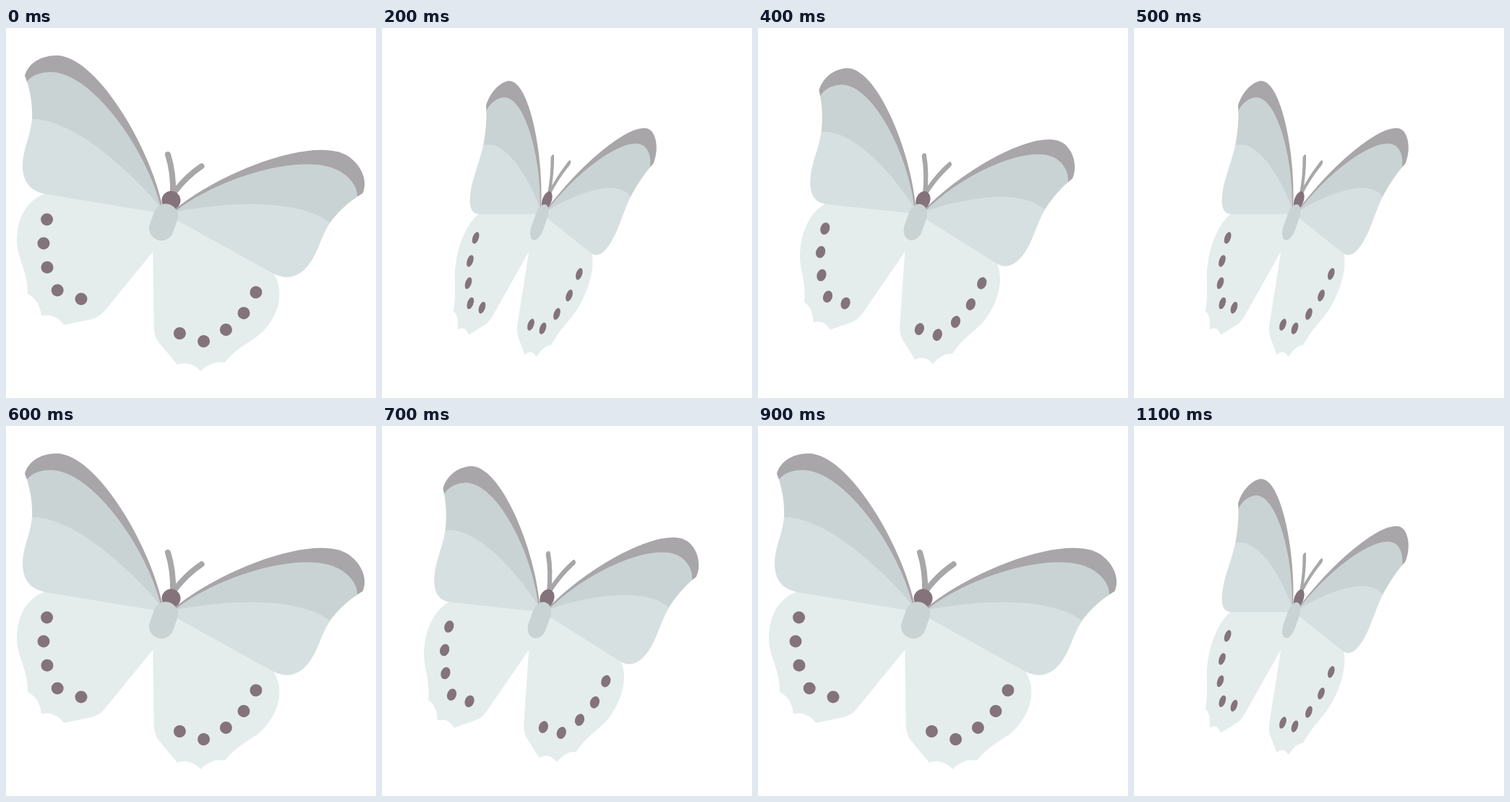
Animation, 512 px wide and 512 px high, one loop 1200 ms. Source, as an HTML page:

```html
<!DOCTYPE html>
<html lang="en">
<head>
<meta charset="utf-8">
<title>Butterfly</title>
<style>
  html, body { margin: 0; width: 100%; height: 100%; overflow: hidden; background: #fff; }
  svg { display: block; width: 100%; height: 100%; }
</style>
</head>
<body>
<svg viewBox="0 0 512 512">
  <g id="butterfly">
    <!-- one side, mirrored across the body axis -->
    <g id="side">
      <path fill="#e4edec" d="M55 229C30 237 15 262 15 293C15 320 30 334 30 368Q46 376 49 398Q69 395 80 411L118 403Q128 401 136 392L205 307.5L224 256Z"/>
      <path fill="#a8a6a9" d="M26 66C30 50 47 38 70 38C124 38 198 162 216 245L213 249L29 74Z"/>
      <path fill="#cad3d4" d="M29 74C36 65 47 61 62 61C119 61 195 169 214 247L210 252L36 128C37 108 34 90 29 74Z"/>
      <path fill="#d7e0e1" d="M36 126C90 126 165 190 213 247L212 256L55 230C34 226 23 213 23 190C23 168 34 150 36 126Z"/>
      <path fill="none" stroke="#a8a6a9" stroke-width="8" stroke-linecap="round" d="M224 175Q232 200 231 230"/>
      <g id="dots" fill="#84737a"></g>
    </g>
    <use id="mirror" href="#side"/>
    <circle cx="228.5" cy="238.6" r="13" fill="#84737a"/>
    <path stroke="#cad3d3" stroke-width="34" stroke-linecap="round" d="M221 260.3L215 277.2"/>
  </g>
</svg>
<script>
  const byId = id => document.getElementById(id);
  const butterfly = byId('butterfly');

  // Scale across the tilted body axis.
  const squeeze = s =>
    `translate(201.2 315.5) rotate(19.2) scale(${s} 1) rotate(-19.2) translate(-201.2 -315.5)`;

  byId('mirror').setAttribute('transform', squeeze(-1));
  byId('dots').innerHTML = [[56.6, 265], [52, 298], [57, 331.3], [71.2, 363], [104, 375]]
    .map(([x, y]) => `<circle cx="${x}" cy="${y}" r="8.5"/>`).join('');

  const STEP = 100;
  const spans = [1, 0.75, 0.495];
  const start = performance.now();

  function draw() {
    const step = Math.floor((performance.now() - start) / STEP) % spans.length;
    butterfly.setAttribute('transform', squeeze(spans[step]));
    requestAnimationFrame(draw);
  }
  draw();
</script>
</body>
</html>
```
